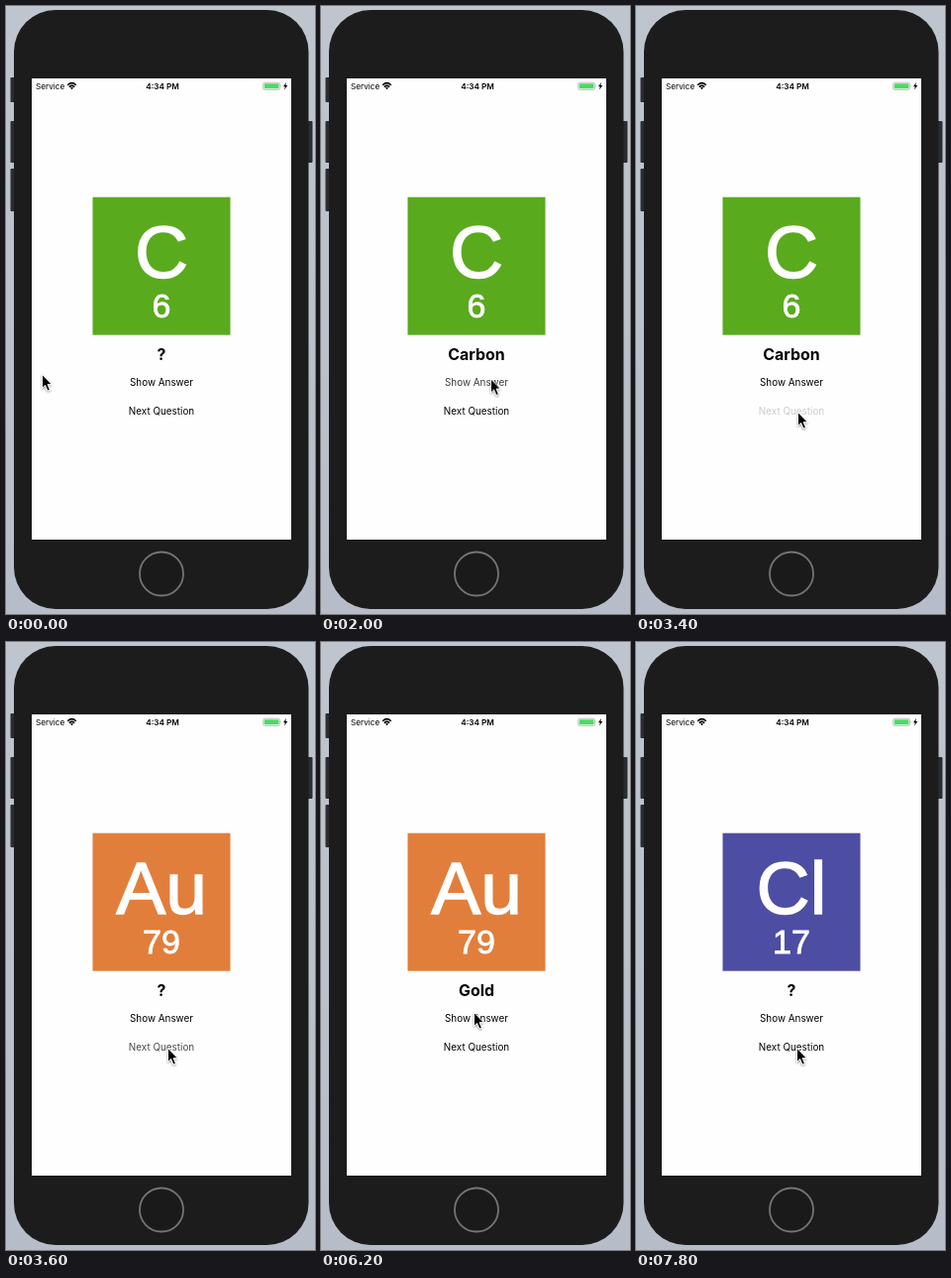
Recreate the animation shown at these times as an HTML page. Size 312 px wide and 613 px high, loop 8 s.

```html
<!DOCTYPE html>
<html lang="en">
<head>
<meta charset="utf-8">
<title>Element quiz</title>
<style>
  html, body { margin: 0; width: 100%; height: 100%; overflow: hidden; background: #bac0ca; }
  svg { display: block; width: 100%; height: 100%; }
  text { font-family: Inter, Roboto, sans-serif; fill: #000; }
  .status { font-size: 8.2px; }
  .time { font-weight: 600; }
  .mid { text-anchor: middle; }
  .button { font-size: 9.9px; }
  .answer { font-size: 15.9px; font-weight: 700; }
  .card text {
    font-family: "Liberation Sans", Arial, sans-serif;
    fill: #fff; stroke: #fff; text-anchor: middle;
  }
  .card .symbol { font-size: 75px; stroke-width: 1.4px; }
  .card .number { font-size: 34px; stroke-width: .8px; }

  .card, .answer { opacity: 0; animation: 8s step-end infinite; }
  .carbon-card { animation-name: carbon-card; }
  .gold-card { animation-name: gold-card; }
  .chlorine-card { animation-name: chlorine-card; }
  .unknown { animation-name: unknown; }
  .carbon { animation-name: carbon; }
  .gold { animation-name: gold; }
  @keyframes carbon-card { 0% { opacity: 1 } 42.75%, 100% { opacity: 0 } }
  @keyframes gold-card { 0% { opacity: 0 } 42.75% { opacity: 1 } 93.75%, 100% { opacity: 0 } }
  @keyframes chlorine-card { 0% { opacity: 0 } 93.75%, 100% { opacity: 1 } }
  @keyframes unknown {
    0%, 42.75%, 93.75%, 100% { opacity: 1 }
    22.5%, 72.5% { opacity: 0 }
  }
  @keyframes carbon { 0% { opacity: 0 } 22.5% { opacity: 1 } 42.75%, 100% { opacity: 0 } }
  @keyframes gold { 0% { opacity: 0 } 72.5% { opacity: 1 } 93.75%, 100% { opacity: 0 } }

  /* Buttons dim at once when pressed and fade back on release. */
  .show { animation: show 8s linear infinite; }
  .next { animation: next 8s linear infinite; }
  @keyframes show {
    0%, 20%, 26%, 70%, 76%, 100% { opacity: 1 }
    20.01%, 22.5%, 70.01%, 72.5% { opacity: .2 }
  }
  @keyframes next {
    0%, 41.2%, 46.25%, 91.2%, 97.25%, 100% { opacity: 1 }
    41.21%, 42.75%, 91.21%, 93.75% { opacity: .2 }
  }

  .cursor { animation: cursor 8s ease-in-out infinite; }
  @keyframes cursor {
    0%, 2.5% { transform: translate(36px, 371px) }
    11.25%, 12.5% { transform: translate(140px, 378px) }
    17.5%, 32.5% { transform: translate(171px, 375.5px) }
    40%, 55% { transform: translate(163px, 409px) }
    65%, 67.5% { transform: translate(154px, 373px) }
    77.5% { transform: translate(154px, 373px) }
    87.5%, 100% { transform: translate(162px, 409px) }
  }
</style>
</head>
<body>
<svg viewBox="0 0 312 613" preserveAspectRatio="none">
  <defs>
    <linearGradient id="backdrop" x2="0" y2="1">
      <stop stop-color="#bfc5ce"/>
      <stop offset="1" stop-color="#b7bdc8"/>
    </linearGradient>
    <filter id="shadow" x="-50%" y="-50%" width="200%" height="200%">
      <feDropShadow dx="0" dy="1.2" stdDeviation="1" flood-opacity=".4"/>
    </filter>
  </defs>

  <rect width="312" height="613" fill="url(#backdrop)"/>
  <g fill="#2a2c30">
    <rect x="4.5" y="72" width="6" height="25" rx="1"/>
    <rect x="4.5" y="116" width="6" height="42" rx="1"/>
    <rect x="4.5" y="164" width="6" height="43" rx="1"/>
    <rect x="303" y="116" width="6.5" height="42" rx="1"/>
  </g>
  <rect x="8" y="4" width="297.5" height="604" rx="42" fill="#1c1c1c"/>
  <rect x="26" y="73" width="262" height="465" fill="#fefefe"/>
  <circle cx="157" cy="572.5" r="22" fill="#1a1a1a" stroke="#747474" stroke-width="1.8"/>

  <text class="status" x="30" y="83.6">Service</text>
  <g fill="none" stroke="#000" stroke-width="1.5">
    <path d="M62.2 79.7Q66.5 75.6 70.8 79.7M63.8 81.6Q66.5 79.1 69.2 81.6"/>
    <path d="M66.5 84.2l-1.5-1.7q1.5-1.2 3 0z" fill="#000" stroke="none"/>
  </g>
  <text class="status time mid" x="158" y="83.6">4:34 PM</text>
  <rect x="259.6" y="77.2" width="17" height="7.2" rx="1.6" fill="none" stroke="#a9a9a9" stroke-width=".7"/>
  <rect x="260.7" y="78.3" width="14.8" height="5" rx=".7" fill="#4cd964"/>
  <path d="M277.6 79.6q1.2 1.2 0 2.4z" fill="#a9a9a9"/>
  <path d="M283 77l-3 4.2h1.8l-.7 3.2 3.2-4.4h-1.9z"/>

  <g class="card carbon-card">
    <rect x="87.5" y="192.7" width="139" height="139" fill="#5aaa1e"/>
    <text class="symbol" x="157" y="273.5">C</text>
    <text class="number" x="157" y="313.5">6</text>
  </g>
  <g class="card gold-card">
    <rect x="87.5" y="192.7" width="139" height="139" fill="#e27e3b"/>
    <text class="symbol" x="157" y="273.5">Au</text>
    <text class="number" x="157" y="313.5">79</text>
  </g>
  <g class="card chlorine-card">
    <rect x="87.5" y="192.7" width="139" height="139" fill="#4d4ea3"/>
    <text class="symbol" x="157" y="273.5">Cl</text>
    <text class="number" x="157" y="313.5">17</text>
  </g>

  <text class="answer mid unknown" x="157" y="356.5">?</text>
  <text class="answer mid carbon" x="157" y="356.5">Carbon</text>
  <text class="answer mid gold" x="157" y="356.5">Gold</text>
  <text class="button mid show" x="157" y="383">Show Answer</text>
  <text class="button mid next" x="157" y="412.3">Next Question</text>

  <g class="cursor">
    <path d="M.5 .5V14.3L3.6 11.4 6 17 8.4 16 6 10.6H10.2Z" fill="#000"
      stroke="#fff" stroke-width=".9" stroke-linejoin="round" filter="url(#shadow)"/>
  </g>
</svg>
</body>
</html>
```
